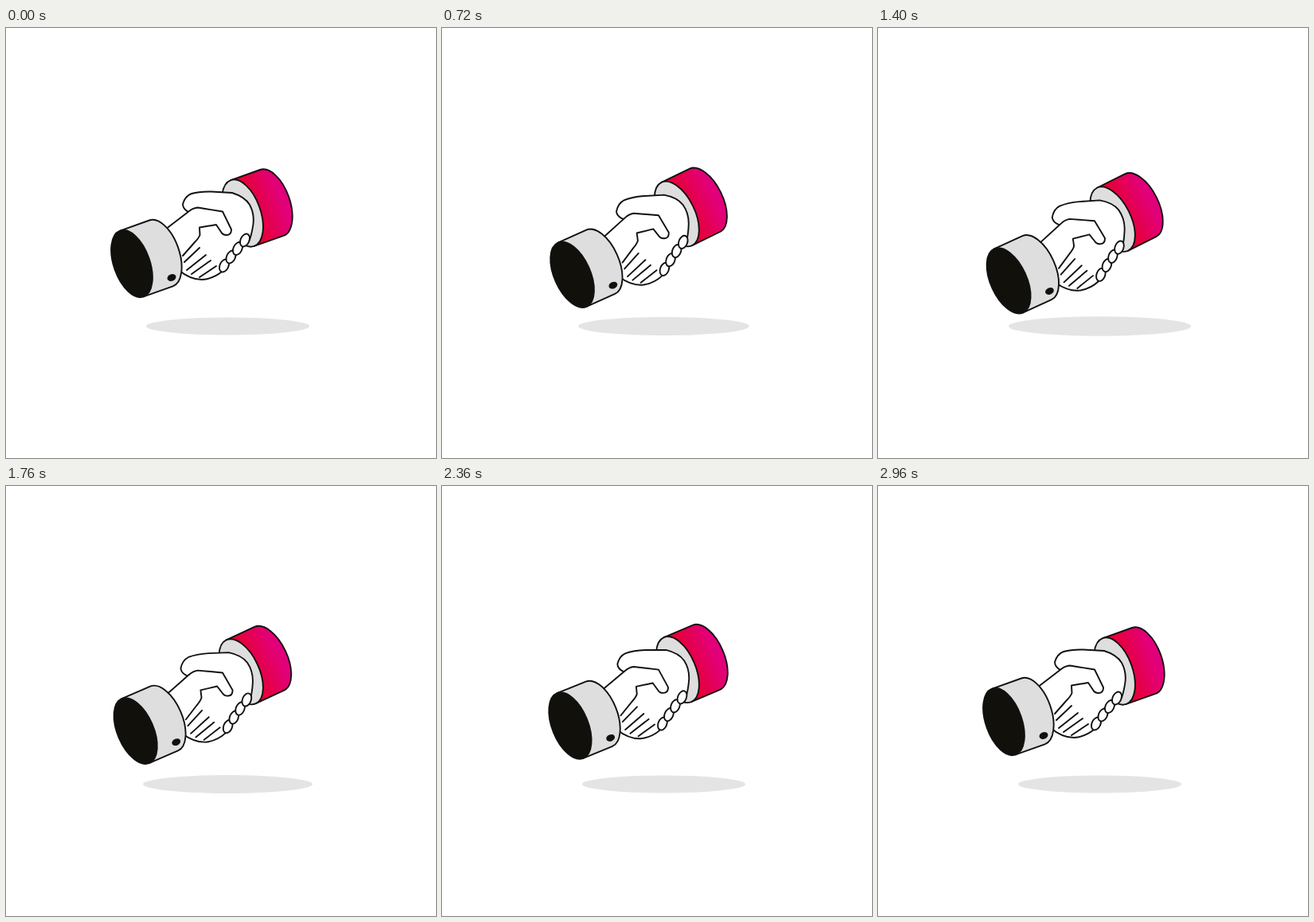
These frames come from a looping animation (540 px wide and 540 px high, 8000 ms). An HTML page without scripts:

```html
<!DOCTYPE html>
<html lang="en">
<head>
<meta charset="utf-8">
<title>Handshake</title>
<style>
  html, body { margin: 0; width: 100%; height: 100%; overflow: hidden; background: #fff; }
  svg { display: block; width: 100vw; height: 100vh; }

  .ink { stroke: #111; stroke-width: 1.9; stroke-linecap: round; stroke-linejoin: round; }
  .skin { fill: #fff; }
  .cloth { fill: #dedede; }
  .dark { fill: #12100b; }
  .line { fill: none; }

  .shadow, .pair, .arm { animation: 8s linear infinite; }
  .shadow { fill: #e4e4e4; transform-origin: 278.5px 374.5px; animation-name: spread; }
  .pair { animation-name: dip; }
  .arm { animation-name: turn; }
  .right { --turn: -7deg; transform-origin: 265px 250px; }
  .left { --turn: -5deg; transform-origin: 275px 231px; }

  @keyframes spread {
    0%, 26%, 100% { scale: 1; }
    5% { scale: 1; animation-timing-function: cubic-bezier(.37, 0, .63, 1); }
    15% { scale: 1.134; animation-timing-function: cubic-bezier(.37, 0, .63, 1); }
  }
  @keyframes dip {
    0%, 26%, 100% { translate: 0 0; }
    5% { translate: 0 0; animation-timing-function: cubic-bezier(.37, 0, .63, 1); }
    15% { translate: 0 13px; animation-timing-function: cubic-bezier(.37, 0, .63, 1); }
  }
  @keyframes turn {
    0% { rotate: 0deg; animation-timing-function: cubic-bezier(.37, 0, .63, 1); }
    11%, 17.5% { rotate: var(--turn); }
    22% { rotate: calc(var(--turn) * .78); }
    26% { rotate: calc(var(--turn) * .66); }
    32.5% { rotate: calc(var(--turn) * .36); }
    37%, 100% { rotate: 0deg; }
  }
</style>
</head>
<body>
<svg viewBox="0 0 540 540">
  <defs>
    <linearGradient id="sleeve">
      <stop offset=".1" stop-color="#e6002a"/>
      <stop offset=".85" stop-color="#e2007a"/>
    </linearGradient>
    <path id="tube" d="M0-44H39A22.6 44 0 0 1 39 44H0Z"/>
    <ellipse id="rim" rx="22.6" ry="44"/>
    <ellipse id="tip" rx="5.4" ry="8.4"/>
  </defs>

  <ellipse class="shadow" cx="278.5" cy="374.5" rx="102.5" ry="11"/>

  <g class="pair ink">
    <g class="arm right">
      <g transform="translate(297 232.5) rotate(-19.5)">
        <use href="#tube" fill="url(#sleeve)"/>
        <use href="#rim" class="cloth"/>
      </g>
      <path class="skin" d="M229 231Q222 227 222 221Q225 211 233 208Q243 205 258 205.500L284 207Q300 212 306 222Q312 233 310.500 246Q309 257 306 266L301 272L280 288L240 280Z"/>
    </g>

    <g class="arm left">
      <path class="skin" stroke="none" d="M195 256L232 229L240 225L272 230L283 253L298 266L270 306L246 316L215 308Z"/>
      <path class="line" d="M200 253L230 230Q235 226 241 225.500L272 230.500L283 253Q283 260 277 260Q272 260 270 256L264 247L243 250.500L243.500 260Q242 264 237 269L222 286"/>
      <path class="line" d="M243 276L224 294M251 285L227 304M257 292L233 309M264 299L243 313"/>
      <path class="line" d="M217 304Q231 316 246 316Q260 315 271 306"/>
      <g class="skin">
        <use href="#tip" transform="translate(274 298.500) rotate(25)"/>
        <use href="#tip" transform="translate(282.500 287.500) rotate(25)"/>
        <use href="#tip" transform="translate(291 277) rotate(25)"/>
        <use href="#tip" transform="translate(300 266.500) rotate(25)"/>
      </g>
      <g transform="translate(158 296) rotate(-19.5)">
        <use href="#tube" class="cloth"/>
        <use href="#rim" class="dark"/>
      </g>
      <ellipse class="dark" stroke="none" rx="5.6" ry="4.2" transform="translate(208 313.500) rotate(-20)"/>
    </g>
  </g>
</svg>
</body>
</html>
```
